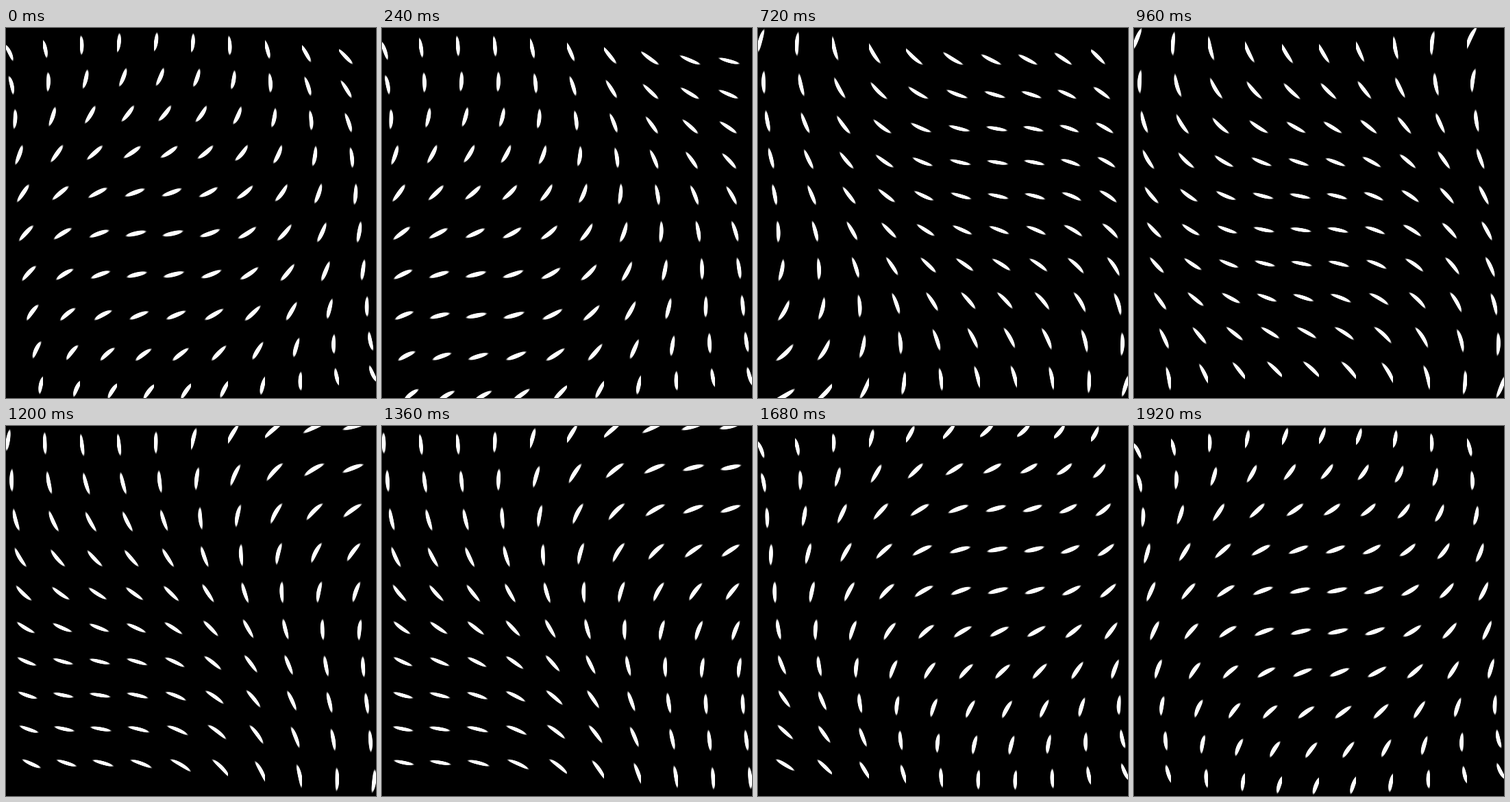
An HTML page with a canvas for the animation above (2000 ms loop, 540x540 px).

```html
<!DOCTYPE html>
<html lang="en">
<head>
<meta charset="utf-8">
<title>Turning blades</title>
<style>
  html, body { margin: 0; width: 100%; height: 100%; overflow: hidden; background: #000; }
  canvas { display: block; width: 540px; height: 540px; }
</style>
</head>
<body>
<canvas width="540" height="540"></canvas>
<script>
const SIZE = 540, CELL = 54, HALF = CELL / 2;
const STEP_MS = 80, STEPS = 25, PHASES = 30;
const SWING = 0.7, START = 0.4;   // radians
const ctx = document.querySelector('canvas').getContext('2d');
const image = ctx.createImageData(SIZE, SIZE);
const pixels = new Uint32Array(image.data.buffer);

// One travelling wave sampled along an axis
const wave = shift => Float64Array.from({ length: SIZE },
  (_, i) => SWING * Math.cos(4 * ((i + 0.5) / SIZE - 0.5) + shift));

// Brightness of a thin soft ellipse, long along v
function blade(u, v) {
  const d = Math.hypot(5 * u, v);
  const k = Math.min(1, Math.max(0, (17 - d) / 5));
  return k * k * (3 - 2 * k);
}

function draw(phase) {
  const across = wave(phase), down = wave(-phase);
  for (let py = 0, i = 0; py < SIZE; py++) {
    const y = (py + 0.5) % CELL - HALF;
    const offset = (py + 0.5) / 10 - HALF;   // blades drift right further down
    for (let px = 0; px < SIZE; px++, i++) {
      const x = (px + 0.5) % CELL - HALF;
      const angle = across[px] + down[py];
      const c = Math.cos(angle), s = Math.sin(angle);
      const grey = Math.round(255 * blade(x * c + y * s - offset, y * c - x * s));
      pixels[i] = 0xff000000 | grey * 0x010101;
    }
  }
  ctx.putImageData(image, 0, 0);
}

let shown = -1;
const begin = performance.now();

function tick() {
  const step = Math.floor((performance.now() - begin) / STEP_MS) % STEPS;
  if (step !== shown) {
    shown = step;
    // 30 phases shown in 25 steps, so every sixth phase is skipped
    const n = Math.floor(step * PHASES / STEPS);
    draw(START + 2 * Math.PI * n / PHASES);
  }
  requestAnimationFrame(tick);
}
tick();
</script>
</body>
</html>
```
